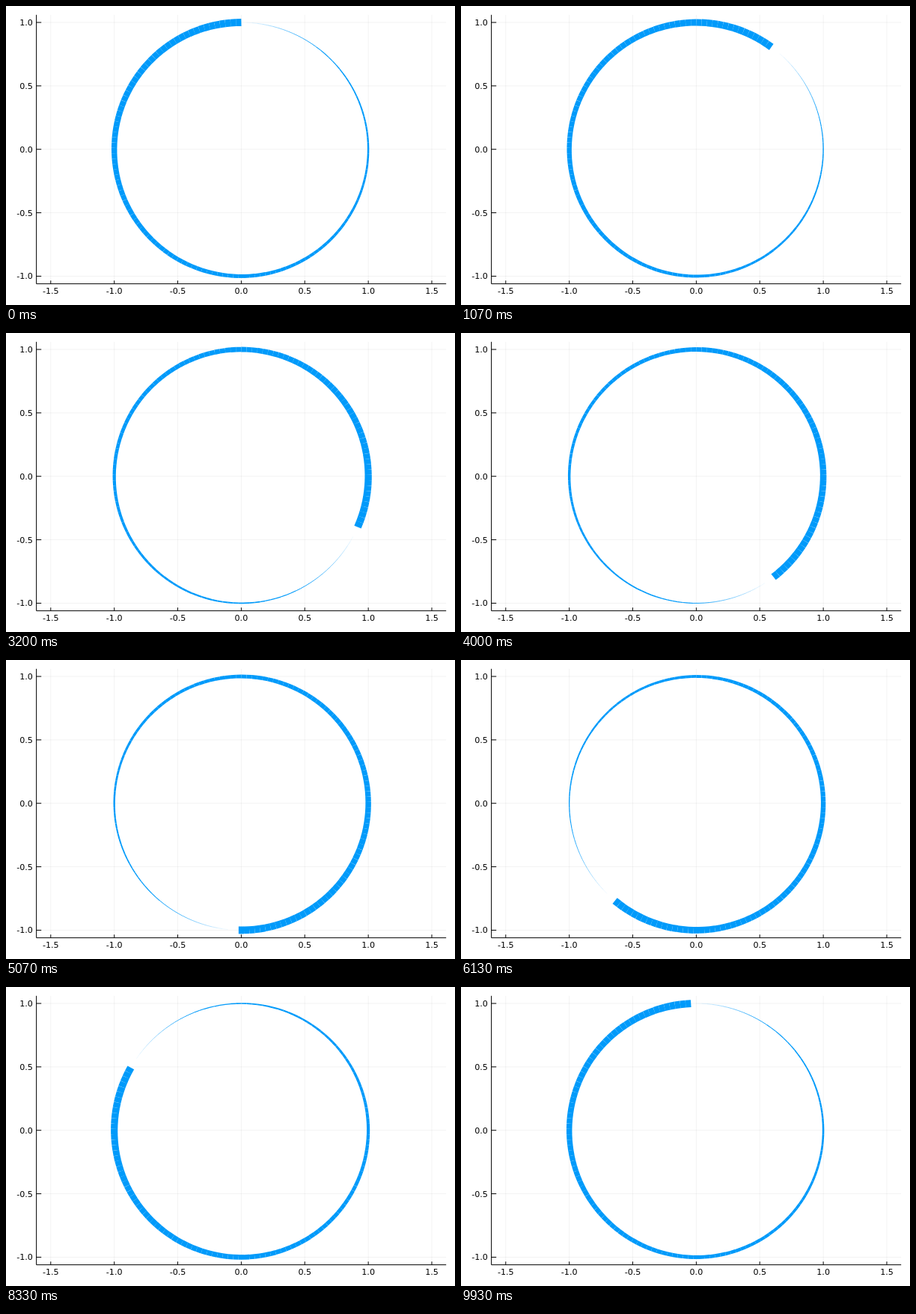
Animation, 600 px wide and 400 px high, one loop 9.99 s. Source, as an HTML page with a canvas:

```html
<!DOCTYPE html>
<html lang="en">
<head>
<meta charset="utf-8">
<title>Circle plot</title>
<style>
  html, body { margin: 0; width: 100%; height: 100%; overflow: hidden; background: #fff; }
  svg, canvas { position: absolute; left: 0; top: 0; width: 600px; height: 400px; }
  text { font: 11.1px "DejaVu Sans", sans-serif; fill: #000; }
  .grid { stroke: #000; stroke-opacity: .1; stroke-width: .5; }
  .axis { stroke: #000; stroke-width: 1; }
</style>
</head>
<body>
<svg id="axes" viewBox="0 0 600 400"></svg>
<canvas id="ring" width="600" height="400"></canvas>
<script>
const LEFT = 40.6, RIGHT = 588.19, TOP = 11.81, BOTTOM = 371.65;
const CX = (LEFT + RIGHT) / 2, CY = (TOP + BOTTOM) / 2;
const R = (BOTTOM - TOP) / 2.12;
const N = 150, LOOP = 9990, MAX_WIDTH = 10;

const svg = document.getElementById('axes');

function add(tag, attrs, text = '') {
  const el = document.createElementNS('http://www.w3.org/2000/svg', tag);
  for (const key in attrs) el.setAttribute(key, attrs[key]);
  el.textContent = text;
  svg.append(el);
}

const line = (cls, x1, y1, x2, y2) => add('line', { class: cls, x1, y1, x2, y2 });
const label = (x, y, anchor, value) =>
  add('text', { x, y, 'text-anchor': anchor }, value.toFixed(1));

for (let v = -1.5; v <= 1.5; v += 0.5) {
  const x = CX + v * R;
  line('grid', x, TOP, x, BOTTOM);
  line('axis', x, BOTTOM, x, BOTTOM - 4.3);
  label(x, 385, 'middle', v);
}
for (let v = -1; v <= 1; v += 0.5) {
  const y = CY - v * R;
  line('grid', LEFT, y, RIGHT, y);
  line('axis', LEFT, y, LEFT + 6.6, y);
  label(35.9, y + 4, 'end', v);
}
line('axis', LEFT, BOTTOM, RIGHT, BOTTOM);
line('axis', LEFT, TOP, LEFT, BOTTOM);

const ctx = document.getElementById('ring').getContext('2d');
ctx.strokeStyle = '#009afa';

function point(i) {
  const a = 2 * Math.PI * (i % N) / (N - 1);
  return [CX + R * Math.sin(a), CY - R * Math.cos(a)];
}

// Separate butt-ended segments, widening from the tail to the head.
function drawRing(step) {
  ctx.clearRect(0, 0, 600, 400);
  for (let j = 1; j < N - 1; j++) {
    ctx.lineWidth = MAX_WIDTH * j / (N - 1);
    ctx.beginPath();
    ctx.moveTo(...point(step + j));
    ctx.lineTo(...point(step + j + 1));
    ctx.stroke();
  }
}

// 15 steps per second, each start rounded to 10 ms.
const stepAt = ms => Math.floor((Math.floor(ms / 10) + 0.5) * 0.15);

const start = performance.now();
let shown = -1;

function tick() {
  const step = stepAt((performance.now() - start) % LOOP);
  if (step !== shown) drawRing(shown = step);
  requestAnimationFrame(tick);
}
tick();
</script>
</body>
</html>
```
